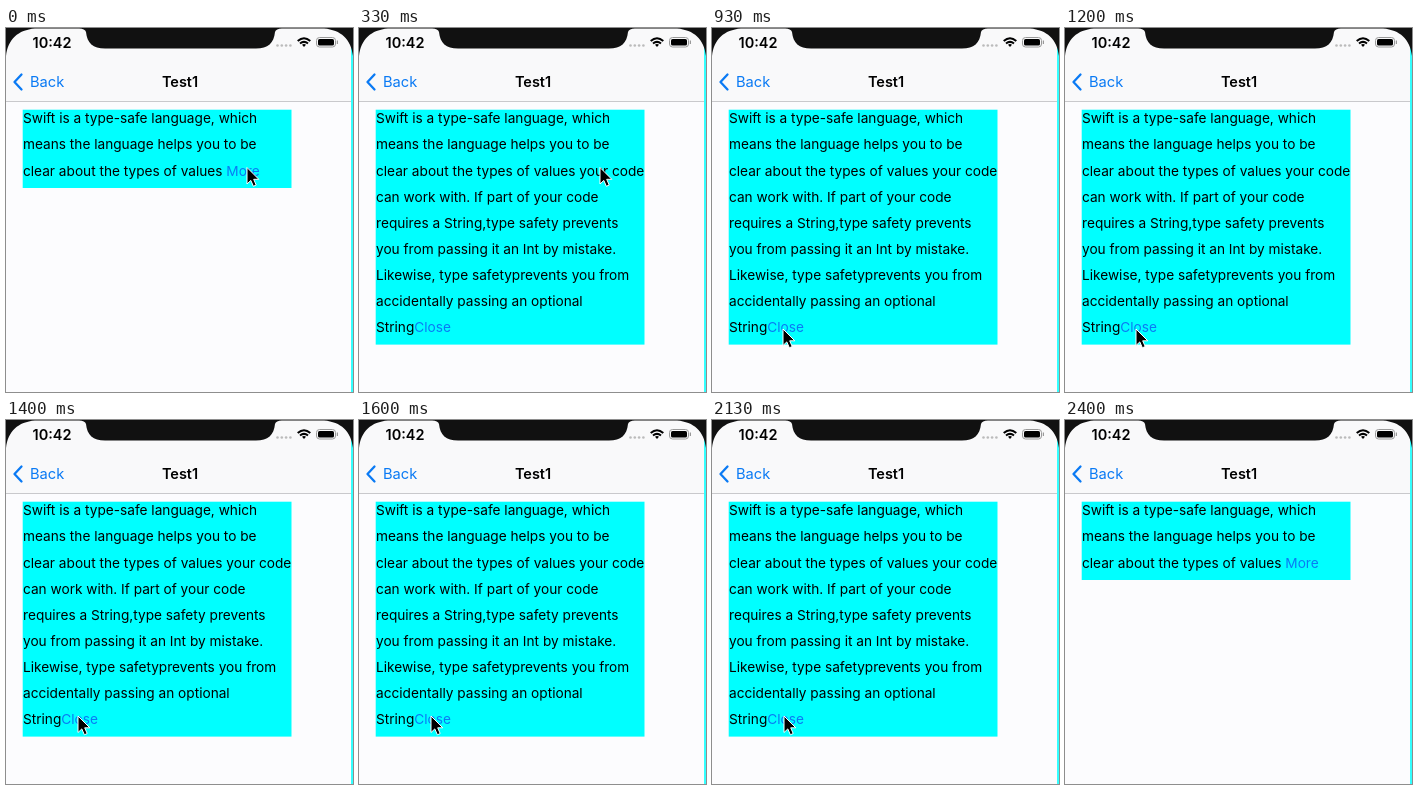
Write an HTML page that moves like this. It is 347 px wide and 364 px high and loops after 2.47 s.

```html
<!DOCTYPE html>
<html lang="en">
<head>
<meta charset="utf-8">
<style>
  html, body { margin: 0; width: 100%; height: 100%; overflow: hidden; background: #fcfcfe; }
  svg { display: block; }
  text { font: 13.66px Inter, "Liberation Sans", sans-serif; white-space: pre; }
  .bold { font-weight: 600; font-size: 14.5px; }
  .link { fill: #0a7af4; }
</style>
</head>
<body>
<svg width="347" height="364" viewBox="0 0 347 364">
  <rect width="347" height="73" fill="#f9f9fa"/>
  <path d="M0 73.5H347" stroke="#c9c9cc"/>
  <path d="M346 16V364" stroke="#3ff" stroke-width="2"/>
  <path fill="#111" d="M0 0H347V28C345 11 335 2 318 .5H276Q270 .5 269 4C268 15 262 20.5 250 20.5H99C87 20.5 81 15 80 4Q79 .5 73 .5H29C12 2 2 11 0 28Z"/>

  <text class="bold" x="26.5" y="19.5">10:42</text>
  <g fill="#bbb">
    <circle cx="271.5" cy="17.5" r="1.3"/><circle cx="275.8" cy="17.5" r="1.3"/>
    <circle cx="280.1" cy="17.5" r="1.3"/><circle cx="284.4" cy="17.5" r="1.3"/>
  </g>
  <g fill="none" stroke="#000" stroke-width="2">
    <path d="M291.7 13Q298 7.4 304.3 13M294 15.6Q298 12.2 302 15.6"/>
    <path d="M296 16.8Q298 15.4 300 16.8L298 19Z" fill="#000" stroke="none"/>
    <rect x="310.5" y="9.5" width="19" height="9.5" rx="3" stroke="#999" stroke-width="1"/>
    <rect x="312" y="11" width="16" height="6.5" rx="1.6" fill="#000" stroke="none"/>
    <path d="M331.4 12.5V16" stroke="#999" stroke-width="1.2"/>
  </g>
  <path d="M15.5 46.5L8.5 54L15.5 61.5" fill="none" stroke="#0a7af4" stroke-width="2.3" stroke-linecap="round" stroke-linejoin="round"/>
  <text class="link" x="24" y="59" style="font-size:14.7px">Back</text>
  <text class="bold" x="174" y="59" text-anchor="middle">Test1</text>

  <rect id="box" x="16.7" y="81.7" width="268.8" fill="#0ff"/>
  <g id="lines"></g>
  <path id="cursor" d="M0 0V16.5L3.8 12.9L6.4 18.8L9.2 17.5L6.7 11.8H11.8Z" stroke="#fff" stroke-width="1"/>
</svg>
<script>
const LOOP = 2470, EXPAND = 200, COLLAPSE = 2200, HIDE = 2330;
const TOP = 95.3, PITCH = 26.1;
const full = [
  "Swift is a type-safe language, which",
  "means the language helps you to be",
  "clear about the types of values your code",
  "can work with. If part of your code",
  "requires a String,type safety prevents",
  "you from passing it an Int by mistake.",
  "Likewise, type safetyprevents you from",
  "accidentally passing an optional",
  "String"
];
const short = [...full.slice(0, 2), "clear about the types of values "];
// Pointer stops: time, x, y
const stops = [[400, 241, 139.5], [670, 142, 268], [850, 71, 301], [1200, 71, 301], [1400, 72, 296]];

const $ = id => document.getElementById(id);
const ease = p => p * p * (3 - 2 * p);
let shown;

function showText(open) {
  if (open === shown) return;
  shown = open;
  const rows = open ? full : short;
  const link = `<tspan class="link">${open ? "Close" : "More"}</tspan>`;
  $("box").setAttribute("height", rows.length * PITCH);
  $("lines").innerHTML = rows.map((row, i) =>
    `<text x="17" y="${TOP + i * PITCH}">${row}${i === rows.length - 1 ? link : ""}</text>`).join("");
}

function pointerAt(t) {
  if (t <= stops[0][0]) return stops[0].slice(1);
  for (let i = 1; i < stops.length; i++) {
    const [t0, x0, y0] = stops[i - 1], [t1, x1, y1] = stops[i];
    if (t < t1) {
      const p = ease((t - t0) / (t1 - t0));
      return [x0 + (x1 - x0) * p, y0 + (y1 - y0) * p];
    }
  }
  return stops[stops.length - 1].slice(1);
}

function draw(now) {
  const t = now % LOOP;
  showText(t >= EXPAND && t < COLLAPSE);
  $("cursor").setAttribute("transform", `translate(${pointerAt(t)})`);
  $("cursor").setAttribute("visibility", t < HIDE ? "visible" : "hidden");
  requestAnimationFrame(draw);
}
draw(performance.now());
</script>
</body>
</html>
```
